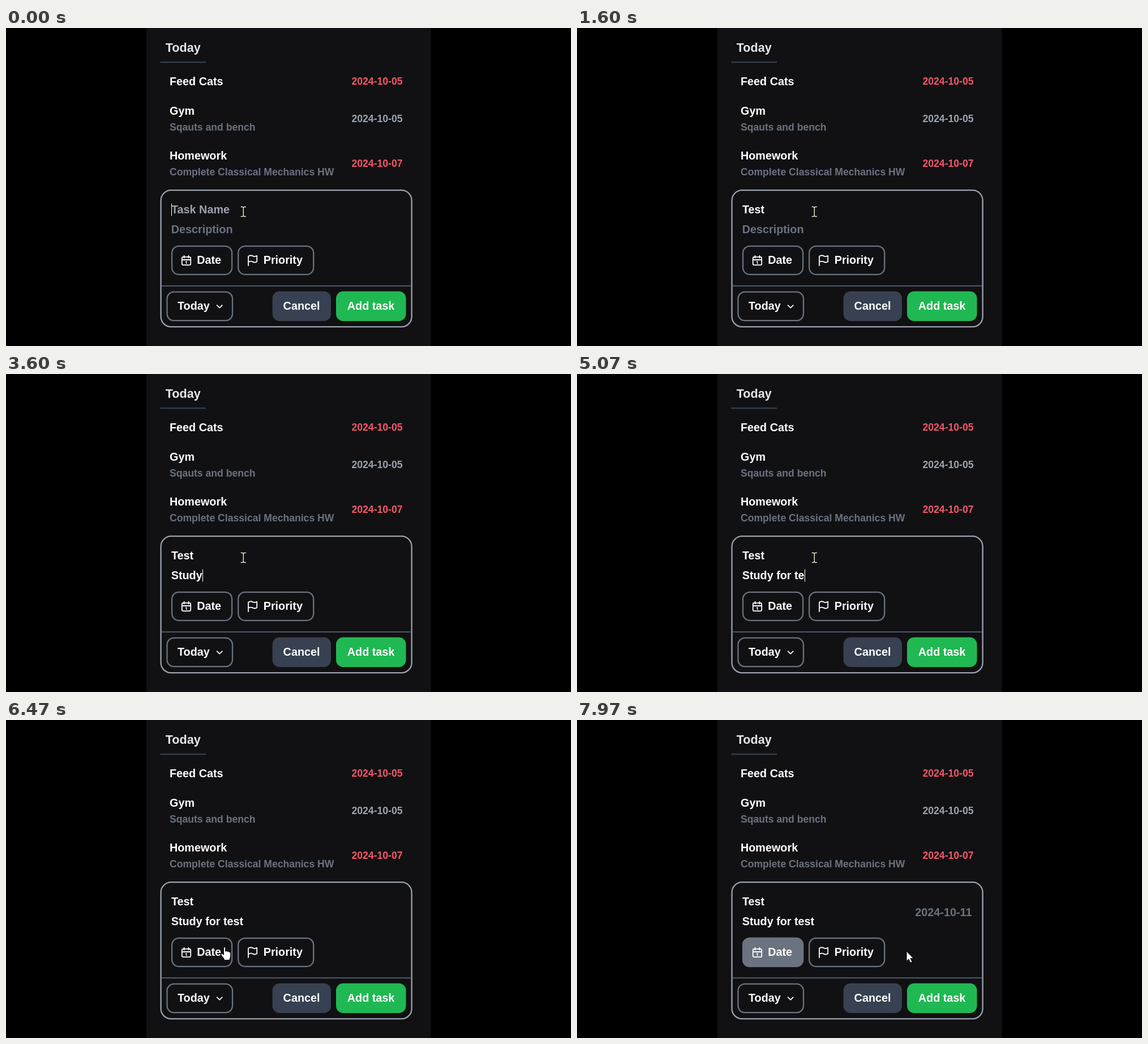
An HTML page for the animation above (8000 ms loop, 998 px wide and 561 px high).

```html
<!DOCTYPE html>
<html lang="en">
<head>
<meta charset="utf-8">
<title>Task form</title>
<style>
  html, body { margin: 0; width: 100%; height: 100%; overflow: hidden; background: #000; }
  svg { display: block; width: 100vw; height: 100vh; }
  text { font: bold 19.8px "Liberation Sans", Arial, sans-serif; fill: #fff; white-space: pre; }
  .small { font-size: 17.6px; }
  .muted { fill: #6b7280; }
  .soft { fill: #9ca3af; }
  .late { fill: #f6566a; }
  .end { text-anchor: end; }
  .button { fill: none; stroke: #6b7280; stroke-width: 2.3; }
  .icon { fill: none; stroke: #fff; stroke-width: 1.8; stroke-linecap: round; stroke-linejoin: round; }
</style>
</head>
<body>
<svg viewBox="0 0 998 561">
  <rect width="998" height="561"/>
  <rect x="248" width="502.5" height="561" fill="#111113"/>

  <text x="281.7" y="42.3" style="font-size:21.6px;fill:#e5e7eb">Today</text>
  <rect x="272.5" y="59.2" width="80.5" height="2.2" fill="#374151"/>

  <text x="289" y="100.8">Feed Cats</text>
  <text x="700.5" y="100.2" class="small late end">2024-10-05</text>
  <text x="289" y="153.3">Gym</text>
  <text x="289" y="181" class="small muted">Sqauts and bench</text>
  <text x="700.5" y="166" class="small soft end">2024-10-05</text>
  <text x="289" y="232.3">Homework</text>
  <text x="289" y="260" class="small muted">Complete Classical Mechanics HW</text>
  <text x="700.5" y="245" class="small late end">2024-10-07</text>

  <rect x="273.6" y="286.2" width="443" height="241" rx="18" fill="none" stroke="#9ca3af" stroke-width="2.3"/>
  <rect x="274.7" y="453.9" width="440.8" height="2.2" fill="#4b5563"/>
  <text id="name" x="292" y="326.6"></text>
  <text id="note" x="291.7" y="361.8"></text>
  <rect id="caret" width="1" height="22" fill="#fff"/>
  <text id="due" x="597.3" y="346.3" class="muted">2024-10-11</text>

  <rect id="dateFill" x="292" y="383.7" width="108.2" height="52.3" rx="13" fill="#6b7280"/>
  <rect class="button" x="293.1" y="384.8" width="106" height="50" rx="12"/>
  <g class="icon">
    <rect x="310.8" y="403.8" width="15.4" height="14.4" rx="2.4"/>
    <path d="M310.8 409H326.2M314.6 401.6V405.6M322.4 401.6V405.6"/>
    <path d="M317.4 412.6L318.7 411.8V415.8" stroke-width="1.4"/>
    <path d="M428 419V402.8C431 400.6 434 401.2 436 402.3S440.5 403.4 443.2 401.8V412.3C440.5 414 437.8 413.5 436 412.6S431 411.2 428 413"/>
    <path d="M372.6 489.2L377.2 493.7L381.8 489.2"/>
  </g>
  <text x="337.2" y="416.4">Date</text>
  <rect class="button" x="410.2" y="384.8" width="133" height="50" rx="12"/>
  <text x="454.7" y="416.4">Priority</text>

  <rect class="button" x="284.5" y="465.6" width="115.5" height="50.5" rx="12"/>
  <text x="303" y="497.3">Today</text>
  <rect x="470.6" y="464.5" width="103.4" height="52.5" rx="12.5" fill="#374151"/>
  <text x="489.6" y="497.3">Cancel</text>
  <rect x="583" y="464.5" width="123.5" height="52.5" rx="12.5" fill="#20b852"/>
  <text x="602.8" y="497.3">Add task</text>

  <g id="beam" fill="none">
    <path id="beamPath" d="M-4.6 -8.6H-1.5L0 -7.4L1.5 -8.6H4.6M0 -7.4V7.4M-4.6 8.6H-1.5L0 7.4L1.5 8.6H4.6" stroke="#000" stroke-width="3"/>
    <use href="#beamPath" style="stroke:#fff"/>
    <path d="M-4.6 -8.6H-1.5L0 -7.4L1.5 -8.6H4.6M0 -7.4V7.4M-4.6 8.6H-1.5L0 7.4L1.5 8.6H4.6" stroke="#f4f1dc" stroke-width="1.5"/>
  </g>
  <path id="hand" fill="#fff" stroke="#000" stroke-width="1"
    d="M-3.6 -9.5C-3.6 -12 -.4 -12 -.4 -9.5V-3.8C.2 -5 2.6 -4.8 2.8 -3.2C3.6 -4.4 5.7 -4 5.9 -2.4C7 -3.2 8.8 -2.6 8.8 -.8V4C8.8 7 7.2 8.4 6.8 11.6H-2.4C-2.8 8 -6 5.8 -7.8 2.4C-8.8 .4 -6.6 -.8 -5.2 .8L-3.6 2.4Z"/>
  <path id="arrow" transform="translate(582 408)" fill="#fff" stroke="#000" stroke-width="1"
    d="M0 0V17.6L4 13.8L6.8 20.2L10 18.8L7.2 12.6H12.6Z"/>
</svg>
<script>
const LOOP = 8000, BLINK = 530;
const TAB = 2100, MOVE = 6070, ARRIVE = 6230, CLICK = 6530, PICKED = 7770;
const el = id => document.getElementById(id);
const clamp = v => Math.max(0, Math.min(1, v));
const show = (node, on) => node.setAttribute("visibility", on ? "visible" : "hidden");

const name = {
  node: el("name"), value: "Test", hint: "Task Name", hintColor: "#9ca3af",
  keys: [200, 430, 600, 770], left: 292, top: 309.5
};
const note = {
  node: el("note"), value: "Study for test ", hint: "Description", hintColor: "#6b7280",
  keys: [2930, 3100, 3230, 3370, 3570, 3970, 4270, 4400, 4500, 4630, 4930, 5070, 5200, 5330, 5570],
  erase: 5770, left: 292, top: 344.5
};

function typeInto(field, t) {
  let count = field.keys.filter(k => k <= t).length;
  if (t >= field.erase) count--;
  const text = field.value.slice(0, count);
  field.node.textContent = text || field.hint;
  field.node.style.fill = text ? "#fff" : field.hintColor;
  field.end = field.left + (text ? field.node.getComputedTextLength() : 0);
}

function placeCaret(t) {
  const field = t < TAB ? name : note;
  const events = [...field.keys, t < TAB ? 0 : TAB, field.erase ?? 0];
  const last = Math.max(...events.filter(k => k <= t));
  const caret = el("caret");
  caret.setAttribute("x", Math.round(field.end));
  caret.setAttribute("y", field.top);
  show(caret, t < CLICK && (t - last) % (2 * BLINK) < BLINK);
}

function placePointer(t) {
  const p = clamp((t - MOVE) / (ARRIVE - MOVE));
  const ease = p * p * (3 - 2 * p);
  const x = 419.3 - 31.3 * ease, y = 324 + 88 * ease;
  const overDate = y > 384;
  for (const id of ["beam", "hand"]) el(id).setAttribute("transform", `translate(${x} ${y})`);
  show(el("beam"), t < CLICK && !overDate);
  show(el("hand"), t < CLICK && overDate);
  show(el("arrow"), t >= PICKED);
}

function draw(t) {
  typeInto(name, t);
  typeInto(note, t);
  placeCaret(t);
  placePointer(t);
  el("dateFill").setAttribute("opacity", clamp((t - CLICK) / 150));
  show(el("due"), t >= PICKED);
}

const start = performance.now();
function tick() {
  draw((performance.now() - start) % LOOP);
  requestAnimationFrame(tick);
}
tick();
</script>
</body>
</html>
```
